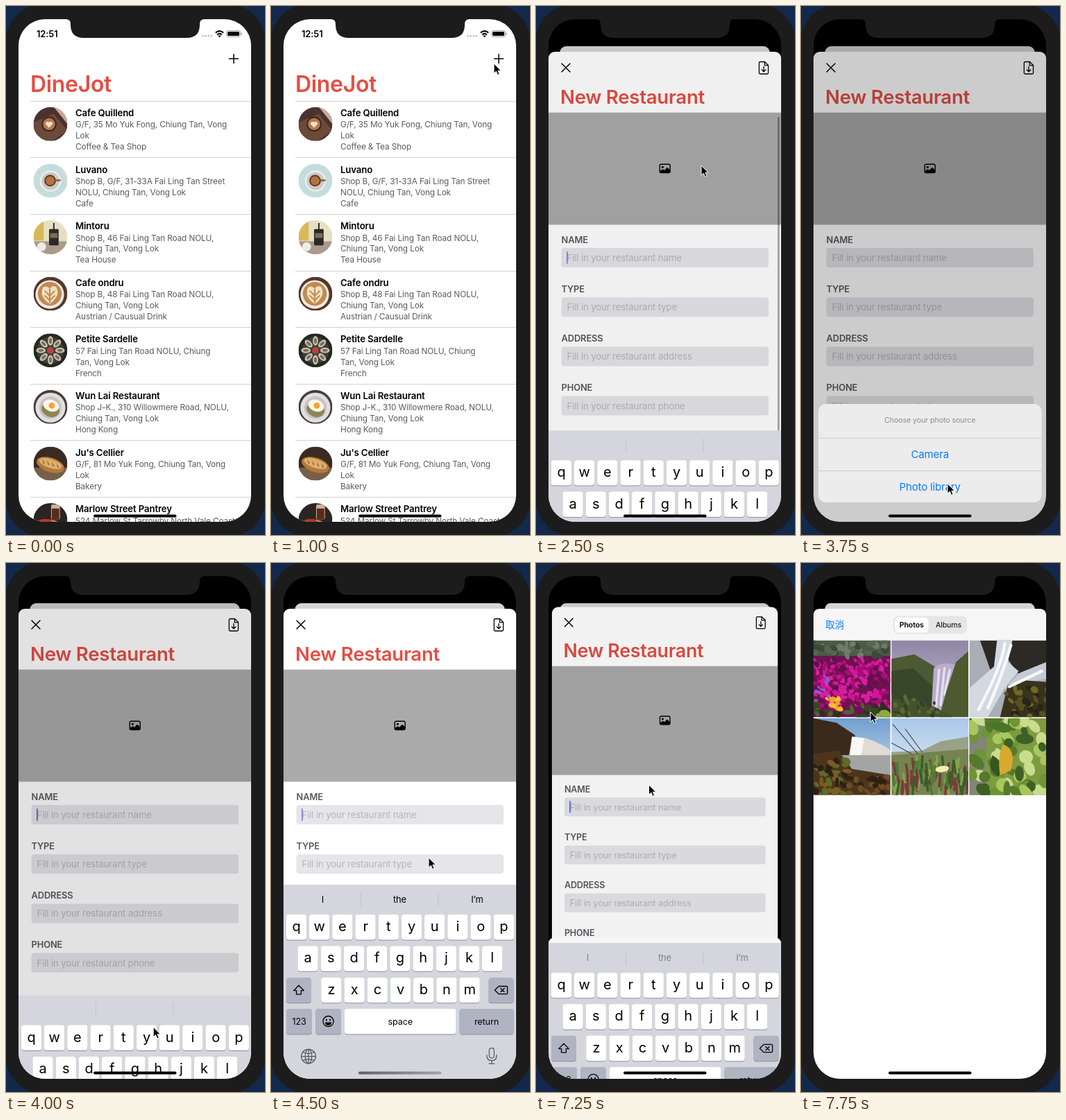
An HTML page for the animation above (8000 ms loop, 373x763 px).

```html
<!DOCTYPE html>
<html lang="en">
<head>
<meta charset="utf-8">
<title>Restaurant form</title>
<style>
  html, body { margin: 0; width: 100%; height: 100%; overflow: hidden; background: #12294c; }
  svg { display: block; }
  text { font-family: Inter, "Noto Sans CJK TC", "Noto Sans CJK", sans-serif; letter-spacing: -.01em; }
  .mid { text-anchor: middle; }
  .semi { font-weight: 600; }
  .line { fill: none; stroke: #000; stroke-width: 1.5; stroke-linecap: round; stroke-linejoin: round; }
  .soft { stroke: #55565b; stroke-width: 1.2; }
  .thin { stroke-width: 1.3; }
  .latte { stroke: #c08b52; stroke-width: 4; }
  .fall { stroke: #e6dff0; stroke-width: 3; }
  .stream { stroke: #f6f8fb; stroke-width: 4; }
  .twig { stroke: #3c4250; stroke-width: 1; }
</style>
</head>
<body>
<script>
const LOOP = 8000, STEP = 250, ACCENT = '#e64d43', BLUE = '#0a7aff';
const LEFT = 18, TOP = 19, WIDE = 335, CARD_TOP = 58, SHEET_TOP = 66, BOTTOM = 744, CENTER = 186;

let seed = 11;
const rnd = () => (seed = seed * 16807 % 2147483647) / 2147483647;

const text = (x, y, size, str, fill = '#000', cls = '') =>
  `<text x="${x}" y="${y}" font-size="${size}" fill="${fill}" class="${cls}">${str}</text>`;
const rect = (x, y, w, h, fill, rx = 0, extra = '') =>
  `<rect x="${x}" y="${y}" width="${w}" height="${h}" fill="${fill}" rx="${rx}" ${extra}/>`;
const circle = (x, y, r, fill) => `<circle cx="${x}" cy="${y}" r="${r}" fill="${fill}"/>`;
const oval = (x, y, rx, ry, fill, turn = 0) =>
  `<ellipse rx="${rx}" ry="${ry}" fill="${fill}" transform="translate(${x} ${y}) rotate(${turn})"/>`;
const shape = (d, fill) => `<path d="${d}" fill="${fill}"/>`;
const line = (d, cls = '') => `<path d="${d}" class="line ${cls}"/>`;
const group = (id, body) => `<g id="${id}">${body}</g>`;
const many = (n, fn) => Array.from({ length: n }, (_, i) => fn(i)).join('');
const gradient = (id, a, b, dir = 'x2="0" y2="1"') =>
  `<linearGradient id="${id}" ${dir}><stop stop-color="${a}"/><stop offset="1" stop-color="${b}"/></linearGradient>`;
const picture = (x, y, size, body) =>
  `<svg x="${x}" y="${y}" width="${size}" height="${size}" viewBox="0 0 100 100">${body}</svg>`;
const scatter = (n, x, y, w, h, r, colors) => many(n, i =>
  oval(x + rnd() * w, y + rnd() * h, r * (.6 + rnd() * .7), r * (.4 + rnd() * .5), colors[i % colors.length], rnd() * 90));

// Restaurant list
const rows = [
  ['Cafe Quillend', 'G/F, 35 Mo Yuk Fong, Chiung Tan, Vong', 'Lok', 'Coffee &amp; Tea Shop'],
  ['Luvano', 'Shop B, G/F, 31-33A Fai Ling Tan Street', 'NOLU, Chiung Tan, Vong Lok', 'Cafe'],
  ['Mintoru', 'Shop B, 46 Fai Ling Tan Road NOLU,', 'Chiung Tan, Vong Lok', 'Tea House'],
  ['Cafe ondru', 'Shop B, 48 Fai Ling Tan Road NOLU,', 'Chiung Tan, Vong Lok', 'Austrian / Causual Drink'],
  ['Petite Sardelle', '57 Fai Ling Tan Road NOLU, Chiung', 'Tan, Vong Lok', 'French'],
  ['Wun Lai Restaurant', 'Shop J-K., 310 Willowmere Road, NOLU,', 'Chiung Tan, Vong Lok', 'Hong Kong'],
  ["Ju's Cellier", 'G/F, 81 Mo Yuk Fong, Chiung Tan, Vong', 'Lok', 'Bakery'],
  ['Marlow Street Pantrey', '524 Marlow St Tarrowby North Vale Coast', '', '']
];

const thumbs = [
  rect(0, 0, 100, 100, '#4b3230') + shape('M0 45 60 20 100 70 55 100 0 90Z', '#6a4a3a') + shape('M60 0H100V50Z', '#c9a79b')
    + circle(46, 50, 22, '#3a2320') + circle(46, 50, 18, '#b9784a') + shape('M46 61 35 49Q38 39 46 45 54 39 57 49Z', '#f3e3cf'),
  rect(0, 0, 100, 100, '#c6dcdc') + circle(50, 51, 31, '#e9efee') + circle(50, 51, 26, '#cfc8c0') + circle(49, 50, 17, '#5a3a2c')
    + circle(49, 50, 13, '#b4743f') + rect(64, 46, 16, 6, '#8b6a58', 3),
  rect(0, 0, 100, 100, '#e6dfc2') + rect(0, 0, 30, 60, '#d8b95a') + rect(0, 62, 100, 38, '#a89a8c') + rect(46, 26, 28, 48, '#2b2826', 3)
    + rect(58, 8, 4, 20, '#2b2826') + rect(49, 38, 22, 14, '#7d6d55') + circle(24, 78, 13, '#efece2'),
  rect(0, 0, 100, 100, '#54382a') + circle(48, 52, 42, '#efe9e1') + circle(48, 50, 35, '#c08b52')
    + shape('M48 80Q16 58 28 32 36 24 48 34 60 22 68 32 80 56 48 80Z', '#f1dfc0') + line('M48 36V76M34 42 48 56 62 42M34 56 48 69 62 56', 'latte'),
  rect(0, 0, 100, 100, '#23291f') + circle(50, 50, 40, '#3b3f37')
    + many(8, i => oval(50 + 28 * Math.cos(i * .785), 50 + 28 * Math.sin(i * .785), 14, 8, '#c9c0b0', i * 45)
      + oval(50 + 28 * Math.cos(i * .785), 50 + 28 * Math.sin(i * .785), 8, 4, '#7c6c58', i * 45)) + circle(50, 50, 10, '#b8433a'),
  rect(0, 0, 100, 100, '#4a3d3c') + circle(50, 52, 44, '#dfe0e2') + circle(50, 52, 33, '#c9c4bd') + oval(50, 58, 27, 21, '#8f8450', 20)
    + oval(52, 46, 24, 17, '#f8f5ec', 20) + circle(54, 46, 9, '#f0a52c'),
  rect(0, 0, 100, 100, '#3a2b22') + rect(0, 62, 100, 38, '#77604a') + oval(50, 54, 42, 21, '#b3793c', 18) + oval(50, 50, 35, 13, '#dcae6c', 18)
    + many(4, i => shape(`M${26 + i * 14} ${36 + i * 4}l7 14 -4 0z`, '#8a5527')),
  rect(0, 0, 100, 100, '#2a2523') + rect(52, 4, 26, 44, '#c8b295', 4) + rect(54, 16, 22, 32, '#5a2a1c') + oval(40, 62, 36, 14, '#d58b3a')
    + oval(34, 56, 22, 9, '#b5372b') + oval(66, 66, 18, 8, '#e9dfc8')
];

const row = (r, i) => {
  const y = 137.3 + 81.6 * i;
  return rect(35, Math.floor(y), 320, 1, '#d2d2d5') + `<clipPath id="c${i}"><circle cx="64" cy="${y + 33}" r="24.5"/></clipPath>`
    + `<g clip-path="url(#c${i})">${picture(39.5, y + 8.5, 49, thumbs[i])}</g>` + text(100, y + 21.6, 13.2, r[0], '#000', 'semi')
    + r.slice(1).map((s, k) => text(100, y + 38 + 15.9 * k, 11.8, s, '#5b5b5e')).join('');
};
const list = rect(LEFT, TOP, WIDE, 760, '#fff', 10) + line('M321.5 76H334.5M328 69.5V82.5')
  + text(35, 124, 32, 'DineJot', ACCENT, 'semi') + rows.map(row).join('') + rect(LEFT, TOP, WIDE, 760, '#000', 10, 'id="shade"');

const status = text(44, 44.5, 13, '12:51', '#000', 'semi') + many(4, i => circle(283.5 + i * 4.1, 43, 1.5, '#c4c4c8'))
  + '<g fill="none" stroke="#000" stroke-width="2"><path d="M301.8 38.6Q307.5 33.6 313.2 38.6M304 41.4Q307.5 38.4 311 41.4"/></g>'
  + shape('M305.4 43Q307.5 41.4 309.6 43L307.5 45.2Z', '#000')
  + rect(317.5, 35.5, 20, 9, 'none', 2.6, 'stroke="#888" stroke-width=".8"') + rect(319, 37, 17, 6, '#000', 1.5) + rect(338.6, 38.4, 1.2, 3.2, '#888', .6);

// Form sheet
const field = (name, i) => {
  const y = 336.7 + 71.2 * i;
  return text(36.5, y + 4.8, 12.9, name, '#58585b', 'semi') + rect(36.5, y + 12.3, 298.5, 28, '#e5e5ea', 4)
    + text(44.5, y + 31.2, 13.2, `Fill in your restaurant ${name.toLowerCase()}`, '#b5b5ba');
};
const sheet = rect(LEFT, SHEET_TOP, WIDE, 720, '#fff', 9) + line('M37 83 49 95M49 83 37 95')
  + line('M323 80.5H329.5L334.5 85.5V96.5Q334.5 98 333 98H322.8Q321.3 98 321.3 96.5V82Q321.3 80.5 323 80.5ZM329.3 80.8V85.7H334.2M328 87.5V94.5M325.2 92 328 94.8 330.8 92', 'thin')
  + text(35, 141, 27.6, 'New Restaurant', ACCENT, 'semi') + rect(LEFT, 153.7, WIDE, 161.8, '#aaa')
  + rect(178.2, 228.2, 15, 12.3, 'none', 2, 'stroke="#000" stroke-width="1.4"') + circle(182.3, 232.3, 1.6, '#000')
  + shape('M178.5 240V238L182.5 235.2 184.8 237 189 232.8 193 236.6V240Z', '#000')
  + ['NAME', 'TYPE', 'ADDRESS', 'PHONE'].map(field).join('')
  + rect(44, 354, 1.7, 18, '#4d66dc', .8, 'id="caret"') + rect(348, 160, 2.6, 453, '#000', 1.3, 'id="scroll" opacity=".35"');

const actions = rect(25, 574, 321.5, 142, '#ececed', 11) + text(185.7, 601.2, 10.7, 'Choose your photo source', '#8c8c90', 'mid')
  + rect(25, 623, 321.5, .8, '#c6c6c9') + rect(25, 670, 321.5, .8, '#c6c6c9')
  + text(185.7, 652.3, 15, 'Camera', BLUE, 'mid') + text(185.7, 698.8, 15, 'Photo library', BLUE, 'mid');

// Keyboard
const key = (x, y, w, label = '', size = 12.6, fill = '#fff') => rect(x, y + 1, w, 36.3, '#8d8f98', 4) + rect(x, y, w, 36.3, fill, 4)
  + text(x + w / 2, y + 18 + size * (size > 15 ? .3 : .36), size, label, '#000', 'mid');
const keys = (letters, x, y) => [...letters].map((c, i) => key(x + 33.2 * i, y, 29.3, c, 20)).join('');
const GREY = '#b0b3c1';
const keyboard = rect(LEFT, 464, WIDE, 300, '#d5d6dd')
  + group('hints', text(74.5, 489.5, 12.9, 'I', '#000', 'mid') + text(185.5, 489.5, 12.9, 'the', '#000', 'mid') + text(297, 489.5, 12.9, 'I’m', '#000', 'mid'))
  + rect(129, 475, .8, 20, '#bdbec6') + rect(240.5, 475, .8, 20, '#bdbec6')
  + keys('qwertyuiop', 21.8, 507) + keys('asdfghjkl', 38.4, 552.3) + keys('zxcvbnm', 72.2, 597.8)
  + key(22, 597.8, 36, '', 12, GREY) + line('M40 609.2 47.3 616.6H43.4V622H36.6V616.6H32.7Z', 'thin')
  + key(313.5, 597.8, 36, '', 12, GREY) + line('M322.3 616 328 610.4H339.2Q340.5 610.4 340.5 611.7V620.3Q340.5 621.6 339.2 621.6H328ZM330.8 613.4 336 618.6M336 613.4 330.8 618.6', 'thin')
  + key(22, 643, 37, '123', 12.6, GREY) + key(64.2, 643, 36.8, '', 12, GREY) + key(106, 643, 160.5, 'space') + key(271.5, 643, 78, 'return', 12.6, GREY)
  + '<circle cx="82.5" cy="661" r="7.6" class="line thin"/>' + oval(79.8, 659, 1, 1.5, '#000') + oval(85.2, 659, 1, 1.5, '#000')
  + shape('M77.7 662.3H87.3Q86.3 666.8 82.5 666.8 78.7 666.8 77.7 662.3Z', '#000')
  + '<circle cx="54" cy="711.5" r="10.3" class="line soft"/><ellipse cx="54" cy="711.5" rx="4.8" ry="10.3" class="line soft"/>'
  + line('M43.7 711.5H64.3M54 701.2V721.8M46 705.5Q54 709.5 62 705.5M46 717.5Q54 713.5 62 717.5', 'soft')
  + '<rect x="314.3" y="699.5" width="7" height="14.5" rx="3.5" class="line soft"/>'
  + line('M310.8 709.5V711.5Q311.3 717.4 317.8 717.6 324.3 717.4 324.8 711.5V709.5M317.8 717.6V722M313.8 722H321.8', 'soft');

// Photo picker
const photos = [
  rect(0, 0, 100, 100, '#6d1450') + rect(0, 0, 100, 20, '#4c5a48') + scatter(40, 0, 0, 100, 20, 5, ['#3b4a39', '#6f7d68', '#59664f'])
    + scatter(220, 0, 24, 100, 64, 4, ['#d4149a', '#a80c74', '#d81ea0', '#64104c']) + scatter(14, 0, 46, 24, 34, 3, ['#9a55cc'])
    + scatter(26, 0, 84, 100, 16, 5, ['#33491f', '#4d6530', '#24351a']) + scatter(12, 16, 74, 24, 18, 4, ['#f1a51c', '#f7bd36'])
    + scatter(8, 82, 95, 16, 5, 5, ['#8cab42']),
  rect(0, 0, 100, 100, 'url(#dusk)') + shape('M0 24 30 18 60 36 56 64 20 62 0 70Z', '#4c5a33') + shape('M0 40 28 36 52 58 60 88 0 96Z', '#38472a')
    + shape('M55 36Q64 26 84 32L77 60 68 88 52 90Z', '#b9accb') + line('M62 38 58 86M69 36 64 84M76 38 69 70', 'fall')
    + shape('M84 28 100 14V100H62L72 64Z', '#4d5a2f') + shape('M0 78Q30 70 66 92L80 100H0Z', '#45532c') + scatter(24, 0, 74, 60, 24, 4, ['#5c6b38', '#35432a']),
  rect(0, 0, 100, 100, '#a9adb6') + shape('M14 0H100V40L78 46 62 42 50 24 30 46Z', '#2d2a25')
    + shape('M36 0H56L50 28 64 40 46 62 24 100H0V62L32 34Z', '#d3d8e1') + shape('M100 28V50L66 56 44 64 66 42Z', '#c4cbd5')
    + shape('M50 58 74 52 100 54V100H40Z', '#39331b') + scatter(30, 48, 60, 52, 40, 5, ['#6f6a22', '#28241a', '#59501f'])
    + line('M46 4Q44 30 12 90M54 6Q44 42 24 88M94 40 52 60', 'stream'),
  rect(0, 0, 100, 100, 'url(#day)') + shape('M0 0 30 6 54 22 50 52 0 60Z', '#3a2a1c') + shape('M50 24 68 26Q92 34 100 42V52L46 50Z', '#e0dbd4')
    + shape('M50 24 66 26 62 48 48 50Z', '#faf8f4') + rect(36, 48, 64, 26, '#a3a5a4') + shape('M0 46 32 42 50 66 100 74V100H0Z', '#4c351c')
    + scatter(44, 0, 54, 46, 46, 5, ['#5f6a24', '#2c2014', '#7b5a26']) + scatter(26, 46, 76, 54, 24, 5, ['#6e4d27', '#302114']),
  rect(0, 0, 100, 100, 'url(#pale)') + shape('M0 44 40 42 64 30 100 24V70H0Z', '#9aa189') + shape('M0 48 50 44 100 40V100H0Z', '#74834f')
    + line('M2 8 34 46M18 14 40 44M0 32 26 46', 'twig')
    + many(100, () => { const x = rnd() * 100, y = 64 + rnd() * 42; return `<path d="M${x} ${y}l${rnd() * 8 - 4} -18" stroke="${['#4e7a33', '#7b3b3a', '#88a34c', '#3c5c2b'][x & 3]}" stroke-width="3"/>`; })
    + oval(66, 66, 9, 4, '#f2efae', -8),
  rect(0, 0, 100, 100, '#7d9b40') + rect(0, 0, 22, 100, '#80877a') + scatter(60, 0, 0, 100, 100, 10, ['#a9c75d', '#56792c', '#c8dc8e', '#6e9434', '#3f6024'])
    + shape('M24 8Q46 0 56 14 44 26 24 8Z', '#497527') + shape('M30 48Q22 68 38 76 48 58 30 48Z', '#35561f') + shape('M44 34Q62 40 54 68L40 74Q36 50 44 34Z', '#d9a92c')
];
const picker = rect(LEFT, SHEET_TOP, WIDE, 720, '#fff', 9) + shape('M18 111V75Q18 66 27 66H344Q353 66 353 75V111Z', '#f6f6f7') + rect(LEFT, 110.6, WIDE, .6, '#d0d0d2')
  + text(35, 94, 13.7, '取消', BLUE) + rect(133, 76.3, 106, 25.7, '#e6e6e9', 7) + rect(135, 78, 49, 22.6, '#fff', 5.6, 'stroke="#d9d9dc" stroke-width=".5"')
  + text(159.3, 93, 10.6, 'Photos', '#000', 'mid semi') + text(212.5, 93, 10.6, 'Albums', '#000', 'mid')
  + photos.map((p, i) => picture(LEFT + i % 3 * 112.2, 111.5 + (i / 3 | 0) * 112.2, 110.8, p)).join('');

document.body.innerHTML = `<svg width="373" height="763" viewBox="0 0 373 763">
<defs><clipPath id="screen">${rect(LEFT, TOP, WIDE, BOTTOM - TOP, '#000', 38)}</clipPath>
${gradient('fade', '#5f5f63', '#a2a2a7', '')}${gradient('dusk', '#8f86a6', '#c9c2d2')}${gradient('day', '#6f9fd0', '#e6ecf0')}${gradient('pale', '#a9c8e8', '#eef2f4')}</defs>
${rect(-1, -3, 375, 769, '#1c1c1d', 56)}
<g clip-path="url(#screen)">${rect(0, 0, 373, 763, '#000')}
${group('list', list)}${group('status', status)}${group('sheet', sheet)}${rect(0, 0, 373, 763, '#000', 0, 'id="dim"')}
${group('actions', actions)}${group('picker', picker)}${group('keyboard', keyboard)}
${rect(126, 733.4, 119.5, 4, '#000', 2, 'id="bar"')}</g>
${shape('M87 17H285V19Q279 19.5 279 26V27Q279 46 260 46H112Q93 46 93 27V26Q93 19.5 87 19Z', '#1c1c1d')}
<path id="cursor" d="M0 0V14.2L3.3 11.2 5.6 16.4 8 15.4 5.8 10.3H10.2Z" fill="#000" stroke="#fff" stroke-width="1"/></svg>`;

const el = {};
document.querySelectorAll('[id]').forEach(e => el[e.id] = e);
const set = (id, name, value) => el[id].setAttribute(name, value);
const shift = (id, y) => set(id, 'transform', `translate(0 ${y})`);
// Moves a page so its top edge lands on y, shrinking it as it goes behind another page
const stack = (id, top, y, back) =>
  set(id, 'transform', `translate(${CENTER} ${y}) scale(${1 - .098 * back}) translate(${-CENTER} ${-top})`);

// Critically damped spring from 0 to 1, beginning at the given time
const spring = (t, start) => { const a = Math.max(0, t - start) * .0183; return 1 - (1 + a) * Math.exp(-a); };

const cursorPath = [[250, 366, 240], [1000, 321, 83], [1500, 321, 83], [2250, 238, 230], [2750, 238, 230], [3750, 211, 689],
  [3900, 211, 689], [4500, 227, 425], [4750, 225, 425], [6750, 225, 425], [7750, 100, 215], [LOOP, 100, 215]];
const cursorAt = t => {
  const i = Math.max(1, cursorPath.findIndex(p => p[0] >= t)), [t0, x0, y0] = cursorPath[i - 1], [t1, x1, y1] = cursorPath[i];
  const u = Math.max(0, (t - t0) / (t1 - t0)), k = u * u * (3 - 2 * u);
  return [x0 + (x1 - x0) * k, y0 + (y1 - y0) * k];
};

// The caret fades out and returns once a second
const blink = t => { const phase = t % 1000; return phase < 500 ? 1 : phase < 750 ? .75 : 0; };

function draw(t) {
  const open = spring(t, 1225), menu = spring(t, 2440) - spring(t, 3920), pick = spring(t, 7190);
  const keysUp = open - spring(t, 2403) + spring(t, 3920) - pick;
  const rise = BOTTOM - SHEET_TOP;
  stack('list', TOP, TOP + (CARD_TOP - TOP) * open, open);
  stack('sheet', SHEET_TOP, SHEET_TOP + rise * (1 - open) - (SHEET_TOP - CARD_TOP) * pick, pick);
  set('shade', 'opacity', .17 * open);
  set('status', 'opacity', 1 - open);
  set('dim', 'opacity', .2 * menu + .17 * pick);
  shift('actions', 190 * (1 - menu));
  shift('keyboard', 280 * (1 - keysUp));
  set('hints', 'opacity', Math.max(0, 2 * keysUp - 1));
  shift('picker', rise * (1 - pick));
  set('caret', 'opacity', t >= 2750 && t < 4000 ? 0 : blink(t));
  set('scroll', 'visibility', t >= 2500 && t < 3000 ? 'visible' : 'hidden');
  set('bar', 'fill', t >= 4250 && t < 7250 ? 'url(#fade)' : '#000');
  set('cursor', 'visibility', t < 250 ? 'hidden' : 'visible');
  set('cursor', 'transform', `translate(${cursorAt(t)})`);
}

// Each picture is held for one step
const begin = performance.now();
function tick() {
  draw(Math.floor((performance.now() - begin) % LOOP / STEP) * STEP);
  requestAnimationFrame(tick);
}
tick();
</script>
</body>
</html>
```
